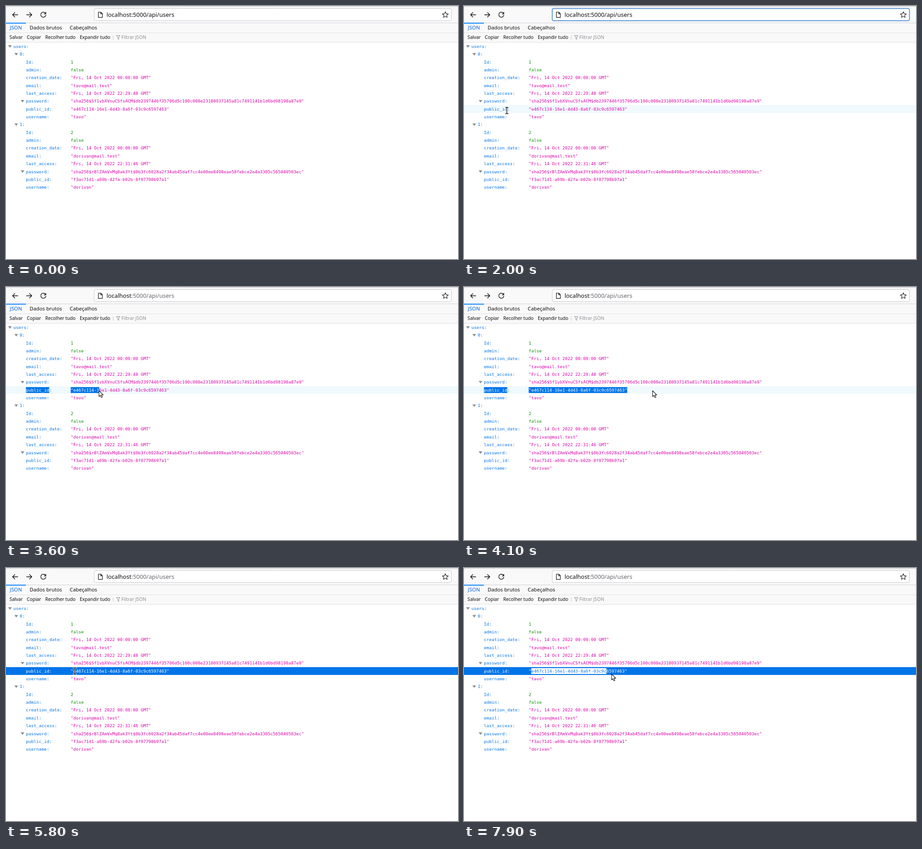
An HTML page with a canvas for the animation above (8 s loop, 999 by 561 pixels).

```html
<!DOCTYPE html>
<html lang="pt-BR">
<head>
<meta charset="utf-8">
<title>JSON</title>
<style>
  html, body { margin: 0; overflow: hidden; background: #fff; }
  canvas { display: block; }
</style>
</head>
<body>
<canvas id="stage" width="999" height="561"></canvas>
<script>
const ctx = document.getElementById('stage').getContext('2d');
const LOOP = 8000, STEP = 100;
const ZOOM = 999 / 1152;
const MONO = `${11 * ZOOM}px "DejaVu Sans Mono", monospace`;
const SANS = size => `${size}px "Noto Sans", sans-serif`;
const BLUE = '#0074e8', STRING = '#dd00a9', NUMBER = '#058b00', INK = '#0c0c0d';
const TOP = 81, ROW = 20 * ZOOM, INDENT = 16 * ZOOM;
const LABEL_X = 44.1, VALUE_X = 143, ID_ROW = 8;

// Moments when the interaction changes state.
const FOCUS = 200, PRESS = 3300, RELEASE = 4300, CLEAR = 5700, DRAG = 7300;

const user = (id, name, access, password, publicId) => Object.entries({
  Id: id,
  admin: 'false',
  creation_date: '"Fri, 14 Oct 2022 00:00:00 GMT"',
  email: `"${name}@mail.test"`,
  last_access: `"Fri, 14 Oct 2022 ${access} GMT"`,
  password: `"sha256$${password}"`,
  public_id: `"${publicId}"`,
  username: `"${name}"`,
}).map(([label, value]) => ({ level: 2, label, value, open: label === 'password' }));

const rows = [
  { level: 0, label: 'users', open: true },
  { level: 1, label: '0', open: true },
  ...user('1', 'tavo', '22:29:48',
    'Sf1vbXVnuCSfsACM$db2397446f35706d5c100c008e23180937145a81c7491141b1d6bd98198a87e9',
    'e467c114-16e1-4d43-8a6f-03c9c6597463'),
  { level: 1, label: '1', open: true },
  ...user('2', 'dorivan', '22:31:46',
    'rBlZAmVxMq8ak3Yt$0b3fc6028a2f34ab45daf7cc4e00ee8498eae58febce2e4a3305c565040503ec',
    'f3ac71d1-a69b-42fa-b02b-8f07798b97a1'),
];

const clamp = (v, lo, hi) => Math.max(lo, Math.min(hi, v));

// Straight pointer moves between a few stops.
const stops = [
  { t: FOCUS, x: 300, y: 0 },
  { t: 1100, x: 232.3, y: 235 },
  { t: 1600, x: 48, y: 240 },
  { t: 1900, x: 103, y: 232 },
  { t: 2700, x: 36.5, y: 230 },
  { t: 3200, x: 36.5, y: 230 },
  { t: 4100, x: 416.7, y: 230 },
  { t: 4200, x: 416.7, y: 230 },
  { t: 4900, x: 152.8, y: 221 },
  { t: 5500, x: 147, y: 220 },
  { t: 5900, x: 153.5, y: 231 },
  { t: 7200, x: 153.5, y: 231 },
  { t: 7900, x: 326, y: 235 },
];

function pointerAt(t) {
  const next = Math.max(1, stops.findIndex(s => s.t > t));
  const [a, b] = t >= stops.at(-1).t ? stops.slice(-2) : stops.slice(next - 1, next + 1);
  const k = clamp((t - a.t) / (b.t - a.t), 0, 1);
  return { x: a.x + (b.x - a.x) * k, y: a.y + (b.y - a.y) * k };
}

function rect(x, y, w, h, color) {
  ctx.fillStyle = color;
  ctx.fillRect(x, y, w, h);
}

// Draws a string and returns where it ends.
function text(str, x, y, font, color) {
  ctx.font = font;
  ctx.fillStyle = color;
  ctx.fillText(str, x, y);
  return x + ctx.measureText(str).width;
}

function stroke(d, color, width) {
  ctx.strokeStyle = color;
  ctx.lineWidth = width;
  ctx.stroke(new Path2D(d));
}

function fill(d, color) {
  ctx.fillStyle = color;
  ctx.fill(new Path2D(d));
}

function drawNavigation(focused, caret, dim) {
  rect(388, 0, 611, 1, '#e4e4e8');
  rect(0, 0.5, 999, 1, '#cacace');
  ctx.lineCap = ctx.lineJoin = 'round';
  stroke('M26 19.5H14.5M19.5 14.5L14.5 19.5L19.5 24.5', INK, 1.35);
  stroke('M45.5 19.5H57M52 14.5L57 19.5L52 24.5', INK, 1.35);
  stroke('M87.2 16.2A5.6 5.6 0 1 0 88 20.5M88 13.8V17.6H84.2', INK, 1.35);

  ctx.beginPath();
  ctx.roundRect(195, 5.5, 789.5, 27, 3.5);
  ctx.fillStyle = '#fff';
  ctx.fill();
  ctx.strokeStyle = focused ? '#5a94dc' : '#c6c6ca';
  ctx.lineWidth = focused ? 1.9 : 1;
  ctx.stroke();

  stroke('M204.2 13.5H209.5L213 17V25.3H204.2ZM209.3 13.7V17.3H212.8', INK, 1.2);
  let star = '';
  for (let i = 0; i < 10; i++) {
    const r = i % 2 ? 3.2 : 6.9, a = i * Math.PI / 5 - Math.PI / 2;
    star += `${i ? 'L' : 'M'}${971 + r * Math.cos(a)} ${19.7 + r * Math.sin(a)}`;
  }
  stroke(star + 'Z', INK, 1.1);

  const font = SANS(15 * ZOOM);
  const hostEnd = text('localhost', 222.2, 23.6, font, INK);
  const end = text(':5000/api/users', hostEnd, 23.6, font, dim ? '#66666d' : INK);
  if (caret) rect(Math.round(end), 12, 1, 15, '#000');
}

function drawViewerBars() {
  rect(0, 37, 999, 1, '#d2d2d6');
  rect(0, 59, 999, 1, '#e0e0e2');
  rect(0, 80, 999, 1, '#e0e0e2');
  rect(0, 37, 44, 2, '#0a84ff');

  let x = 8.6;
  for (const tab of ['JSON', 'Dados brutos', 'Cabeçalhos'])
    x = 17.1 + text(tab, x, 52.2, SANS(13 * ZOOM), tab === 'JSON' ? '#0060df' : INK);

  x = 7.8;
  for (const label of ['Salvar', 'Copiar', 'Recolher tudo', 'Expandir tudo'])
    x = 9.2 + text(label, x, 73.3, SANS(10.2), INK);

  rect(236.5, 65, 1, 10, '#c8c8cc');
  stroke('M244.2 65.5H252L249.2 69.2V74L247 72.4V69.2Z', '#8a8a8e', 1);
  text('Filtrar JSON', 255, 73.3, SANS(10.2), '#8f8f94');
}

// Repaints characters from..to of a string in selection colours.
function select(str, x, y, from, to, charWidth, ink, back) {
  if (to <= from) return;
  ctx.save();
  ctx.beginPath();
  ctx.rect(x + from * charWidth, y + 2.2, (to - from) * charWidth, 13);
  ctx.clip();
  rect(0, y, 999, ROW, back);
  text(str, x, y + 12, MONO, ink);
  ctx.restore();
}

function drawSelection({ label, value }, y, t, pointerX, colors) {
  const w = ctx.measureText('0').width;
  const column = (x, origin, str) => clamp(Math.round((x - origin) / w), 0, str.length);
  if (t >= PRESS && t < CLEAR) {
    const end = t < RELEASE ? pointerX : Infinity;
    select(label, LABEL_X, y, 0, column(end, LABEL_X, label), w, ...colors);
    select(value, VALUE_X, y, 0, column(end, VALUE_X, value), w, ...colors);
  } else if (t >= DRAG) {
    // The highlight trails the pointer a little.
    select(value, VALUE_X, y, 1, column(pointerX - 10, VALUE_X, value), w, ...colors);
  }
}

function drawRow(row, i, hover, t, pointerX) {
  const y = TOP + i * ROW, active = i === ID_ROW && t >= RELEASE;
  if (active) rect(0, y, 999, ROW, BLUE);
  else if (hover) rect(0, y, 999, ROW, '#f0f9fe');

  const x = LABEL_X - (2 - row.level) * INDENT;
  if (row.open) fill(`M${x - 11.7} ${y + 6}h8.2l-4.1 5.4Z`, '#8c8c8c');
  text(row.label + ':', x, y + 12, MONO, active ? '#fff' : BLUE);
  if (!row.value) return;
  const color = row.value[0] === '"' ? STRING : NUMBER;
  text(row.value, VALUE_X, y + 12, MONO, active ? '#fff' : color);
  if (i === ID_ROW) drawSelection(row, y, t, pointerX, active ? [BLUE, '#fff'] : ['#fff', BLUE]);
}

function drawPointer({ x, y }, beam) {
  ctx.save();
  ctx.translate(x, y);
  if (beam) {
    const shape = 'M-2.8 -7H-1L0 -6.2L1 -7H2.8M0 -6.2V6.2M-2.8 7H-1L0 6.2L1 7H2.8';
    stroke(shape, '#fff', 2.8);
    stroke(shape, '#000', 1.3);
  } else {
    const shape = 'M0 0V13L3 10.3L5.3 15.2L7.6 14.1L5.3 9.4H9.4Z';
    fill(shape, '#fff');
    stroke(shape, '#111', 1.1);
  }
  ctx.restore();
}

function draw(t) {
  const pointer = pointerAt(t);
  const visible = t >= FOCUS;
  const focused = visible && t < PRESS;
  const caret = focused && Math.floor((t - 300) / 800) % 3 !== 2;
  const hovered = visible ? Math.floor((pointer.y - TOP) / ROW) : -1;
  const selecting = (t >= PRESS && t < CLEAR) || t >= DRAG;
  const overText = hovered >= ID_ROW && (pointer.x > VALUE_X || Math.abs(pointer.x - 70) < 27);

  rect(0, 0, 999, 561, '#fff');
  rect(0, 0, 999, 80, '#f9f9fa');
  drawNavigation(focused, caret, t >= PRESS);
  drawViewerBars();
  rows.forEach((row, i) => drawRow(row, i, i === hovered, t, pointer.x));
  if (visible) drawPointer(pointer, overText && !selecting);
}

const start = performance.now();
function tick() {
  const t = (performance.now() - start) % LOOP;
  draw(Math.floor(t / STEP) * STEP);
  requestAnimationFrame(tick);
}
tick();
</script>
</body>
</html>
```
